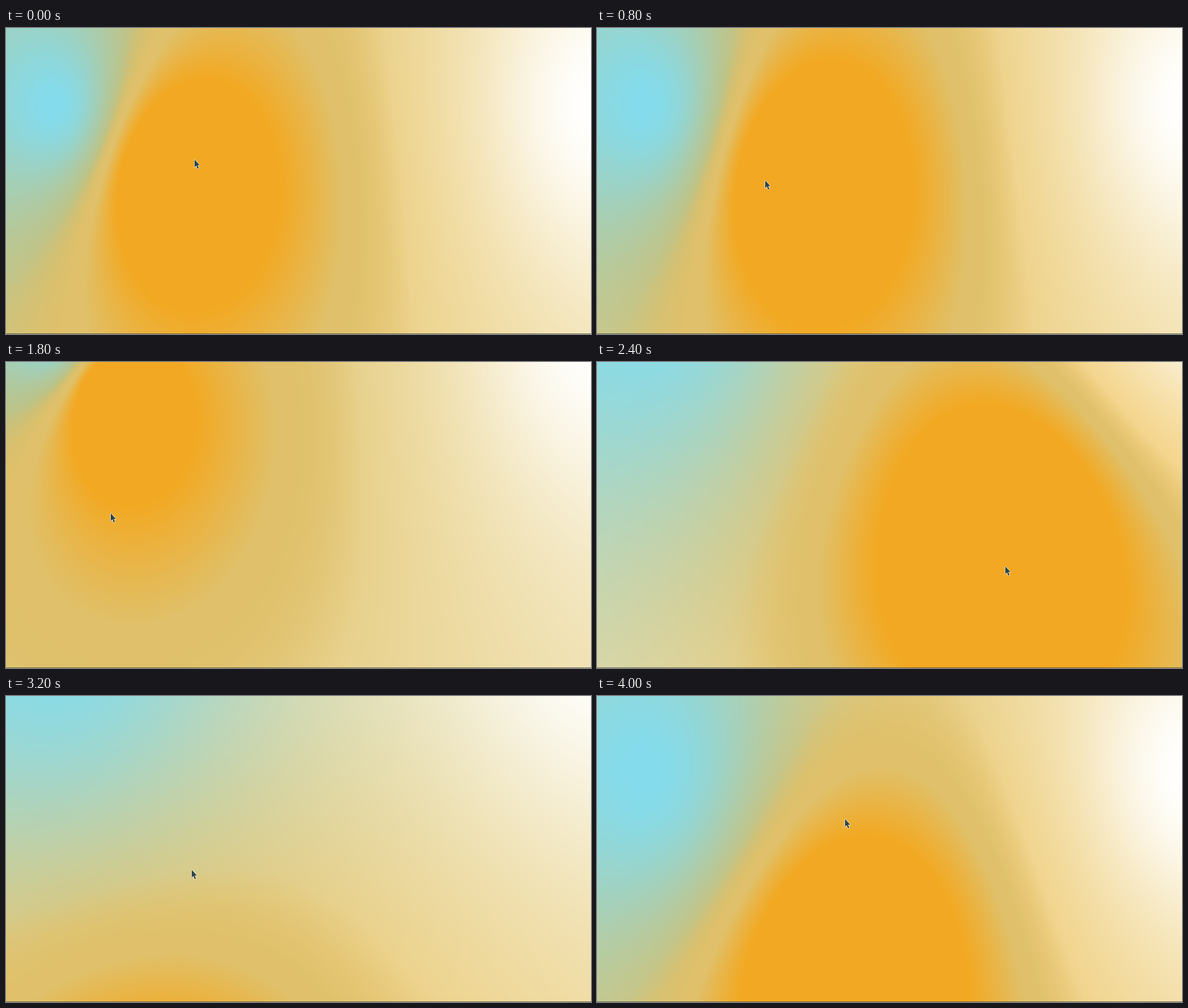
Recreate the animation shown at these times as an HTML page with a canvas. Size 1033x542 px, loop 4.2 s.

```html
<!DOCTYPE html>
<html lang="en">
<head>
<meta charset="utf-8">
<title>Flowing gradient</title>
<style>
  html, body { margin: 0; width: 100%; height: 100%; overflow: hidden; background: #e8cb80; }
  canvas { display: block; width: 100%; height: 100%; }
</style>
</head>
<body>
<canvas id="stage" width="1033" height="542"></canvas>
<script>
const W = 1033, H = 542, LOOP = 4200, STEP = 200;
const ctx = document.getElementById('stage').getContext('2d');
const img = ctx.createImageData(W, H);
const px = img.data;

const BLUE = [131, 219, 236], ORANGE = [242, 168, 33];
const TAN = [223, 192, 106], YELLOW = [243, 216, 140];
const PULL = 1.7;      // extra weight of the orange point
const FLATTEN = 0.78;  // vertical distances count less

const times = [0, 400, 1200, 1800, 2400, 3200, 4000];
const tracks = {
  orangeX: [288, 134, 577, 187, 720, 265, 435],
  orangeY: [260, 169, 362, 62, 320, 885, 487],
  sideY: [136, 136, 135, -62, -150, -150, 134],
  mouseX: [333, 87, 506, 185, 721, 328, 438],
  mouseY: [233, 172, 368, 268, 362, 308, 218]
};

// Cubic curve through the keys that never overshoots them
function sample(v, t) {
  const last = times.length - 1;
  let i = 0;
  while (i < last - 1 && t >= times[i + 1]) i++;
  const slope = k => (v[k + 1] - v[k]) / (times[k + 1] - times[k]);
  const tangent = k => {
    if (k === 0 || k === last) return 0;
    const a = slope(k - 1), b = slope(k);
    return a * b <= 0 ? 0 : 2 * a * b / (a + b);
  };
  const h = times[i + 1] - times[i];
  const u = Math.min(1, (t - times[i]) / h), u2 = u * u, u3 = u2 * u;
  return v[i] * (2 * u3 - 3 * u2 + 1) + v[i + 1] * (3 * u2 - 2 * u3)
    + h * (tangent(i) * (u3 - 2 * u2 + u) + tangent(i + 1) * (u3 - u2));
}

const ramp = (a, b, x) => Math.max(0, Math.min(1, (x - a) / (b - a)));

// Each pixel mixes the points by inverse squared distance
function paintField(ox, oy, sideY) {
  const lowY = 2000 + 2.3 * (sideY - 135);
  const rise = (y, cy) => ((y - cy) * FLATTEN) ** 2 + 1;
  let p = 0;
  for (let y = 0; y < H; y++) {
    const oy2 = rise(y, oy), sy2 = rise(y, sideY), ly2 = rise(y, lowY);
    for (let x = 0; x < W; x++) {
      const ax = x - ox, bx = x - 83, cx = x - 1060, dx = x - 250;
      const wo = PULL / (ax * ax + oy2);
      const wb = 1 / (bx * bx + sy2);
      const ww = 1 / (cx * cx + sy2) + 1 / (dx * dx + ly2);
      const sum = wo + wb + ww;
      const o = wo / sum, b = wb / sum, w = ww / sum;
      const toYellow = 2 * o * w;
      const toTan = ramp(0.5, 0.64, o), toOrange = ramp(0.68, 0.83, o);
      for (let k = 0; k < 3; k++) {
        let c = o * ORANGE[k] + b * BLUE[k] + w * 255;
        c += (YELLOW[k] - c) * toYellow;
        c += (TAN[k] - c) * toTan;
        c += (ORANGE[k] - c) * toOrange;
        px[p++] = c + 0.5;
      }
      px[p++] = 255;
    }
  }
  ctx.putImageData(img, 0, 0);
}

function paintCursor(x, y) {
  const shape = new Path2D('M0 0V13.5L3 10.8L5.2 16.2L7.4 15.3L5.2 10H9Z');
  ctx.save();
  ctx.translate(x, y);
  ctx.lineJoin = 'round';
  ctx.lineWidth = 1.6;
  ctx.strokeStyle = '#f4ead0';
  ctx.fillStyle = '#2b444c';
  ctx.stroke(shape);
  ctx.fill(shape);
  ctx.restore();
}

function draw(t) {
  const at = name => sample(tracks[name], t);
  paintField(at('orangeX'), at('orangeY'), at('sideY'));
  ctx.fillStyle = 'rgba(62, 70, 48, 0.72)';
  ctx.fillRect(0, H - 1, W, 1);
  paintCursor(Math.round(at('mouseX')), Math.round(at('mouseY')));
}

let shown = -1;
function tick() {
  const t = Math.floor((performance.now() % LOOP) / STEP) * STEP;
  if (t !== shown) {
    shown = t;
    draw(t);
  }
  requestAnimationFrame(tick);
}
tick();
</script>
</body>
</html>
```
